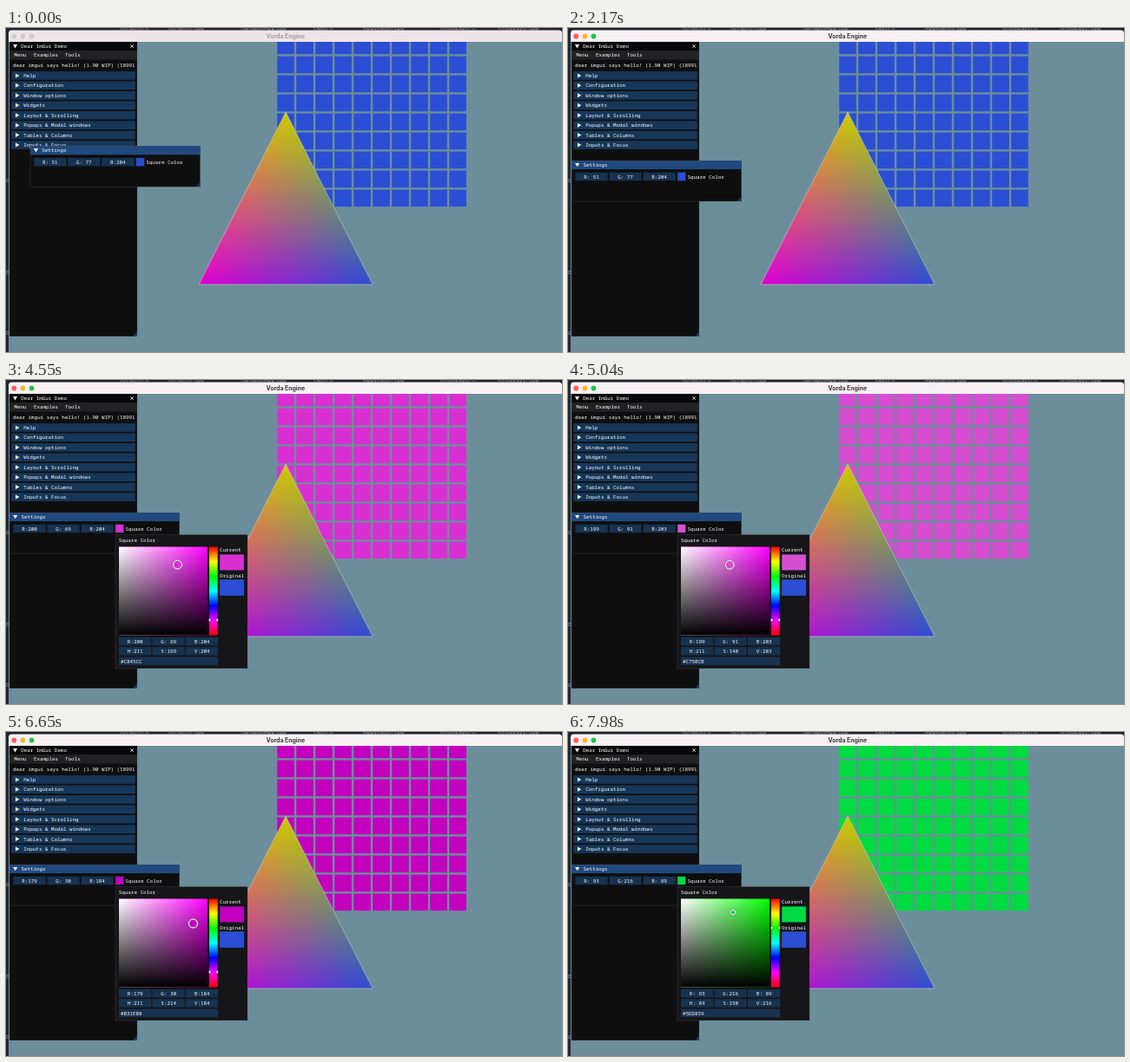
Recreate the animation shown at these times as an HTML page. Size 640 px wide and 374 px high, loop 8000 ms.

```html
<!DOCTYPE html>
<html lang="en">
<head>
<meta charset="utf-8">
<title>Colour picker demo</title>
<style>
  html, body { margin: 0; width: 100%; height: 100%; overflow: hidden; background: #6c8e9b; }
  svg { display: block; width: 100vw; height: 100vh; }
  text { font: 500 5.86px "Noto Sans Mono", "DejaVu Sans Mono", monospace; fill: #fff; white-space: pre; }
  .tab { font: 6.5px Inter, sans-serif; fill: #9a9ca4; }
  .title { font: 700 6.9px Inter, sans-serif; text-anchor: middle; }
  .mid { text-anchor: middle; }
  .field { fill: #17324f; }
  .now { stroke: #17324f; stroke-width: .5; }
  .edge { fill: none; stroke: #6e6e80; stroke-opacity: .45; stroke-width: .5; }
  .mesh { isolation: isolate; }
  .mesh polygon { mix-blend-mode: plus-lighter; }
</style>
</head>
<body>
<svg id="stage" viewBox="0 0 640 374" preserveAspectRatio="none"></svg>
<script>
const LOOP = 8000, STEP = 70;
const FOCUS = 420, OPEN = 2590;
const DRAG = [560, 1540], PICK = [4130, 7150];
const BOX = { x: 130, y: 192.6, size: 102 };

// time, hue, saturation, value
const KEYS = [
  [0, .6383, .75, .8],
  [2870, .6383, .75, .8],
  [3570, .829, .75, .8],
  [4130, .829, .75, .8],
  [5040, .8275, .5505, .7961],
  [5740, .8275, .192, .2945],
  [6650, .8275, .8375, .7216],
  [7150, .8275, .588, .8471],
  [7910, .3281, .588, .8471],
  [LOOP, .3281, .588, .8471]
];

const clamp = x => Math.min(1, Math.max(0, x));
const ease = x => x * x * (3 - 2 * x);
const mix = (a, b, k) => a + (b - a) * k;

function hsvAt(t) {
  const i = KEYS.findIndex(k => k[0] > t);
  const a = KEYS[i - 1], b = KEYS[i];
  const k = ease((t - a[0]) / (b[0] - a[0]));
  return [1, 2, 3].map(n => mix(a[n], b[n], k));
}

function hsvToRgb(h, s, v) {
  return [5, 3, 1].map(n => {
    const k = (n + h * 6) % 6;
    return v - v * s * clamp(Math.min(k, 4 - k));
  });
}

// Wide-gamut display colour brought into sRGB
function shown([r, g, b]) {
  const lin = c => c <= .04045 ? c / 12.92 : ((c + .055) / 1.055) ** 2.4;
  const gam = c => c <= .0031308 ? c * 12.92 : 1.055 * c ** (1 / 2.4) - .055;
  const [R, G, B] = [r, g, b].map(lin);
  const out = [1.2249 * R - .2249 * G, 1.042 * G - .058 * R, 1.0979 * B - .0196 * R - .0786 * G];
  return `rgb(${out.map(c => Math.round(255 * gam(clamp(c))))})`;
}

const rect = (x, y, w, h, fill, more = '') =>
  `<rect x="${x}" y="${y}" width="${w}" height="${h}" fill="${fill}" ${more}/>`;
const text = (x, y, s, more = '') => `<text x="${x}" y="${y}" ${more}>${s}</text>`;
const path = (d, fill, more = '') => `<path d="${d}" fill="${fill}" ${more}/>`;
const field = (x, y, w, id) =>
  rect(x, y, w, 9.4, '', 'class="field"') + text(x + w / 2, y + 6.8, '', `id="${id}" class="mid"`);
const right = (x, y) => path(`M${x} ${y - 2.5}l4.4 2.5-4.4 2.5z`, '#fff');
const down = (x, y) => path(`M${x} ${y - 2}h5l-2.5 4.4z`, '#fff');
const edge = (x, y, w, h) => rect(x, y, w, h, 'none', 'class="edge"');
const grip = (x, y) => path(`M${x} ${y}v-5.5l-5.5 5.5z`, '#1d3652');

function gradient(id, stops, more) {
  const list = stops.map(([o, c, a = 1]) => `<stop offset="${o}" stop-color="${c}" stop-opacity="${a}"/>`);
  return `<linearGradient id="${id}" ${more}>${list.join('')}</linearGradient>`;
}

const CORNERS = [[322, 97], [222, 296], [422, 296]];
const TINTS = [[.8, .8, .2], [.8, .2, .8], [.2, .3, .8]].map(shown);

// One gradient per corner, fading out towards the opposite side
function cornerGradient(i) {
  const [p, a, b] = [0, 1, 2].map(n => CORNERS[(i + n) % 3]);
  const dx = b[0] - a[0], dy = b[1] - a[1];
  const k = ((p[0] - a[0]) * dx + (p[1] - a[1]) * dy) / (dx * dx + dy * dy);
  const foot = [a[0] + k * dx, a[1] + k * dy];
  return gradient('c' + i, [[0, TINTS[i], 1], [1, TINTS[i], 0]],
    `gradientUnits="userSpaceOnUse" x1="${p[0]}" y1="${p[1]}" x2="${foot[0]}" y2="${foot[1]}"`);
}

function defs() {
  const hues = [...Array(7)].map((_, i) => [i / 6, shown(hsvToRgb(i / 6, 1, 1))]);
  const vert = 'x1="0" y1="0" x2="0" y2="1"';
  return '<defs>' + [0, 1, 2].map(cornerGradient).join('') +
    gradient('hues', hues, vert) +
    gradient('white', [[0, '#fff'], [1, '#fff', 0]], '') +
    gradient('black', [[0, '#000', 0], [1, '#000']], vert) +
    '<clipPath id="inner"><rect x="4" y="16" width="144.6" height="340"/></clipPath></defs>';
}

function scene() {
  let tiles = '';
  for (let r = 0; r < 9; r++)
    for (let c = 0; c < 10; c++) tiles += rect(312.2 + 22 * c, 186.6 - 22 * r, 19.6, 19.6, 'inherit');
  const pts = CORNERS.join(' ');
  return rect(3, 10, 637, 364, '#6c8e9b') +
    `<g id="tiles">${tiles}</g><g class="mesh">` +
    [0, 1, 2].map(i => `<polygon points="${pts}" fill="url(#c${i})"/>`).join('') + '</g>' +
    path('M222 296L322 97 422 296z', 'none', 'stroke="#cfcfc8" stroke-opacity=".6" stroke-width=".9"');
}

function frame() {
  const tabs = [[131, 'Renderer.h'], [187, 'Renderer.cpp'], [270, 'SandboxApp.cpp'], [354, 'Layer.h'],
    [411, 'Application.cpp'], [500, 'ImGuiLayer.h'], [566, 'ImGuiLayer.cpp']];
  return rect(0, 0, 640, 5, '#20212a') + rect(0, 0, 3, 374, '#23262e') +
    tabs.map(([x, s]) => text(x, 1.8, s, 'class="tab"')).join('') +
    [178, 284, 354].map(y => text(0, y, 'o', 'class="tab"')).join('') +
    path('M3 16V6q0-3.5 3.5-3.5H636.5q3.5 0 3.5 3.5V16z', '#f3edf0', 'id="bar"') +
    [9.3, 19.4, 29.5].map(x => `<circle class="light" cx="${x}" cy="9.5" r="2.9"/>`).join('') +
    text(321.8, 12, 'Vorda Engine', 'class="title" id="title"');
}

function demo() {
  const rows = ['Help', 'Configuration', 'Window options', 'Widgets', 'Layout &amp; Scrolling',
    'Popups &amp; Modal windows', 'Tables &amp; Columns', 'Inputs &amp; Focus'];
  return rect(4, 16, 147, 340, '#0f0f10') + rect(4, 16, 147, 10, '#08080a') +
    rect(4, 26, 147, 10.5, '#222224') + down(8, 21) + text(17.2, 23.3, 'Dear ImGui Demo') +
    path('M143.2 19.2l3.6 3.6m0-3.6l-3.6 3.6', 'none', 'stroke="#fff" stroke-width=".8"') +
    text(9.5, 33.2, 'Menu') + text(32, 33.2, 'Examples') + text(68, 33.2, 'Tools') +
    text(8, 45.2, 'dear imgui says hello! (1.90 WIP) (18991)', 'clip-path="url(#inner)"') +
    rows.map((s, i) => {
      const y = 54.9 + 11.45 * i;
      return rect(6.3, y - 4.8, 142.5, 9.6, '#17375a') + right(11, y) + text(20.3, y + 2.1, s);
    }).join('') + grip(151, 356) + edge(4, 16, 147, 340);
}

function settings() {
  return '<g id="settings">' + rect(0, 0, 195.5, 47, '#0e0e0f') + rect(0, 0, 195.5, 10, '#21497e') +
    down(4, 4.8) + text(13.3, 7.2, 'Settings') +
    ['r', 'g', 'b'].map((id, i) => field(4.2 + 39 * i, 13.7, 37.3, id)).join('') +
    rect(121.8, 13.7, 9.4, 9.4, '', 'class="now"') + text(133.3, 20.5, 'Square Color') +
    grip(195.5, 47) + edge(0, 0, 195.5, 47) + '</g>';
}

function popup() {
  const cells = ['r2', 'g2', 'b2', 'h', 's', 'v'];
  const { x, y, size } = BOX;
  const layer = (fill, more) => rect(x, y, size, size, fill, more);
  return '<g id="popup">' + rect(126, 178.5, 152, 154.5, '#161517') + edge(126, 178.5, 152, 154.5) +
    text(129.8, 187.2, 'Square Color') +
    layer('', 'id="pure"') + layer('url(#white)') + layer('url(#black)') +
    rect(234, y, 9.6, size, 'url(#hues)') +
    path('M-.6-2.2l3.2 2.2-3.2 2.2zM10.2-2.2l-3.2 2.2 3.2 2.2z', '#fff',
      'id="mark" stroke="#000" stroke-width=".4"') +
    '<circle id="ring" fill="none" stroke="#808080" stroke-width="1.6"/>' +
    '<circle id="dot" stroke="#fff" stroke-width="1"/>' +
    text(246, 198.2, 'Current') + rect(246, 201.2, 28, 18.6, '', 'class="now"') +
    text(246, 227.6, 'Original') + rect(246, 230.3, 28, 18.6, shown([.2, .302, .8])) +
    cells.map((id, i) => field(130 + 38.5 * (i % 3), i < 3 ? 297 : 308.3, 37.3, id)).join('') +
    rect(130, 319.8, 114, 9.4, '', 'class="field"') + text(132, 326.6, '', 'id="hex"') + '</g>';
}

const stage = document.getElementById('stage');
stage.innerHTML = defs() + scene() + frame() + demo() + settings() + popup();

const el = id => document.getElementById(id);
const set = (node, attrs) => { for (const k in attrs) node.setAttribute(k, attrs[k]); };
const lights = document.querySelectorAll('.light');
const swatches = document.querySelectorAll('.now');

function draw(t) {
  const focused = t >= FOCUS;
  const lit = ['#ff5c55', '#f9b92d', '#2bbf42'];
  lights.forEach((c, i) => set(c, { fill: focused ? lit[i] : '#d2cbcd' }));
  set(el('title'), { style: `fill:${focused ? '#3b383a' : '#a69fa2'}` });
  set(el('bar'), { fill: focused ? '#f7f0f2' : '#eee5e8' });

  const k = ease(clamp((t - DRAG[0]) / (DRAG[1] - DRAG[0])));
  set(el('settings'), { transform: `translate(${mix(28, 4.2, k)} ${mix(136.3, 153.1, k)})` });

  const [h, s, v] = hsvAt(t);
  const rgb = hsvToRgb(h, s, v), bytes = rgb.map(c => Math.round(c * 255));
  const color = shown(rgb);
  set(el('tiles'), { fill: color });
  swatches.forEach(n => set(n, { fill: color }));

  const put = (id, name, n) => { el(id).textContent = name + ':' + String(n).padStart(3); };
  ['r', 'g', 'b'].forEach((id, i) => {
    put(id, id.toUpperCase(), bytes[i]);
    put(id + 2, id.toUpperCase(), bytes[i]);
  });
  [h, s, v].forEach((n, i) => put('hsv'[i], 'HSV'[i], Math.round(n * 255)));
  el('hex').textContent = '#' + bytes.map(n => n.toString(16).padStart(2, '0')).join('').toUpperCase();

  set(el('popup'), { visibility: t >= OPEN ? 'visible' : 'hidden' });
  set(el('pure'), { fill: shown(hsvToRgb(h, 1, 1)) });
  set(el('mark'), { transform: `translate(234 ${BOX.y + BOX.size * h})` });
  const spot = { cx: BOX.x + BOX.size * s, cy: BOX.y + BOX.size * (1 - v) };
  const r = t >= PICK[0] && t < PICK[1] ? 4.9 : 2.9;
  set(el('ring'), { ...spot, r: r + .3 });
  set(el('dot'), { ...spot, r, fill: color });
}

const start = performance.now();
function tick() {
  const t = (performance.now() - start) % LOOP;
  draw(Math.floor(t / STEP) * STEP);
  requestAnimationFrame(tick);
}
tick();
</script>
</body>
</html>
```
